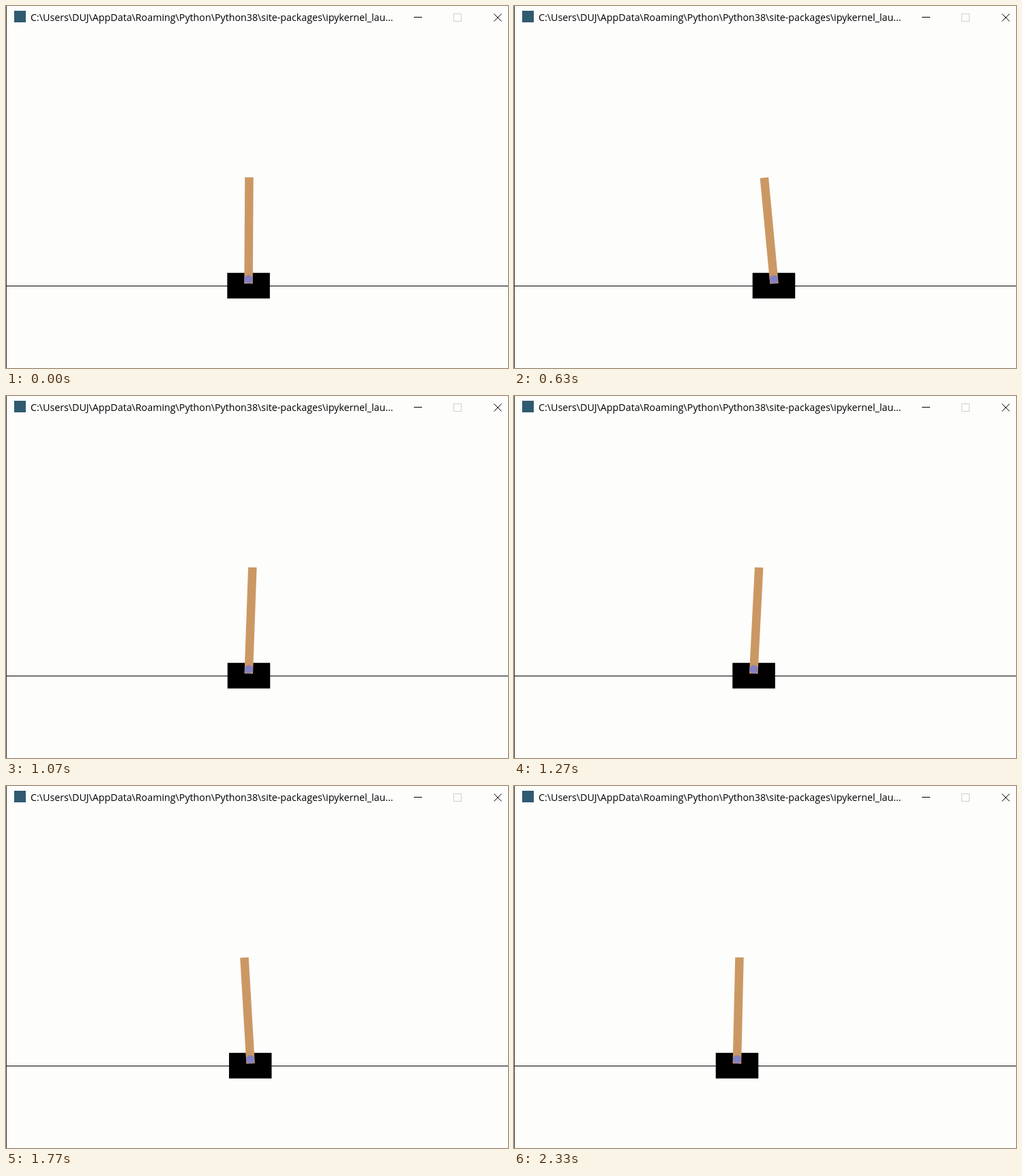
An HTML page with a canvas that plays this animation: 736x532 px, repeating every 2360 ms.

```html
<!DOCTYPE html>
<html lang="en">
<head>
<meta charset="utf-8">
<title>Cart and pole</title>
<style>
  html, body { margin: 0; width: 100%; height: 100%; overflow: hidden; background: #fdfdfc; }
  canvas { display: block; }
</style>
</head>
<body>
<canvas id="stage" width="736" height="532"></canvas>
<script>
const ctx = document.getElementById('stage').getContext('2d');
const LOOP = 2360, LAST_STEP = 70, STEP = 100 / 3;
const TITLE = 'C:\\Users\\DUJ\\AppData\\Roaming\\Python\\Python38\\site-packages\\ipykernel_lau...';

// Turning points of each swing: [seconds, value]
const cartX = [[0, 355.6], [0.62, 381], [1.22, 351.5], [1.97, 359.6], [2.45, 321.8]];
const poleAngle = [[0.1, 0.006], [0.6, -0.095], [1.2, 0.053], [2.08, -0.102], [2.45, 0.06]];

// Cosine easing from one turning point to the next
function swing(turns, t) {
  const next = Math.max(1, turns.findIndex(([time]) => time > t));
  const [t0, a] = turns[next - 1], [t1, b] = turns[next];
  const u = Math.max(0, (t - t0) / (t1 - t0));
  return a + (b - a) * (1 - Math.cos(Math.PI * u)) / 2;
}

function rect(color, x, y, w, h) {
  ctx.fillStyle = color;
  ctx.fillRect(x, y, w, h);
}

function line(x0, y0, x1, y1) {
  ctx.beginPath();
  ctx.moveTo(x0, y0);
  ctx.lineTo(x1, y1);
  ctx.stroke();
}

function drawWindow() {
  rect('#fdfdfc', 0, 0, 736, 532);
  rect('#30302c', 0, 0, 1, 532);
  rect('#2f5a70', 12, 7, 17, 17);

  ctx.fillStyle = '#000';
  ctx.font = '14.25px "Open Sans", "Noto Sans", sans-serif';
  ctx.fillText(TITLE, 36, 22);

  rect('#000', 598, 16, 12, 1);
  ctx.lineWidth = 1;
  ctx.strokeStyle = '#d0d0c8';
  ctx.strokeRect(656.5, 11.5, 11, 11);
  ctx.strokeStyle = '#000';
  line(715.5, 11.5, 726.5, 22.5);
  line(726.5, 11.5, 715.5, 22.5);
}

function drawCart(x, angle) {
  rect('#000', 1, 411, 735, 1);
  rect('#000', x - 31.25, 392.2, 62.5, 37.6);
  ctx.save();
  ctx.translate(x, 401.8);
  ctx.rotate(angle);
  rect('#cb9863', -6.25, -150, 12.5, 156.2);
  ctx.fillStyle = '#8480c2';
  ctx.beginPath();
  ctx.arc(0, 0, 6.2, 0, Math.PI * 2);
  ctx.fill();
  ctx.restore();
}

function frame() {
  const now = performance.now() % LOOP;
  const t = Math.min(Math.floor((now + 5) / STEP), LAST_STEP) * STEP / 1000;
  drawWindow();
  drawCart(swing(cartX, t), swing(poleAngle, t));
  requestAnimationFrame(frame);
}
frame();
</script>
</body>
</html>
```
